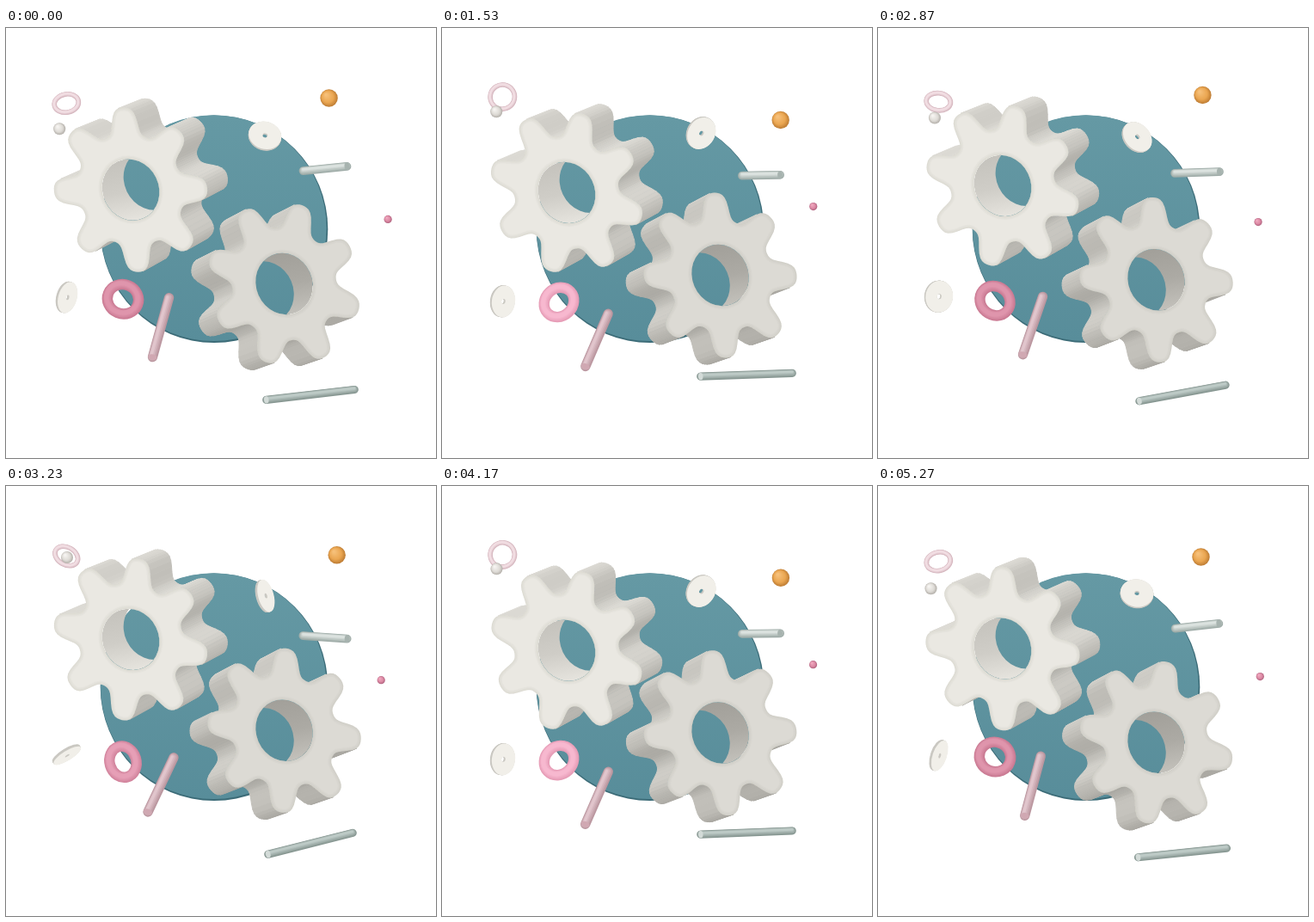
An HTML page with a canvas for the animation above (5310 ms loop, 500 by 500 pixels).

```html
<!DOCTYPE html>
<html lang="en">
<head>
<meta charset="utf-8">
<title>Gears</title>
<style>
  html, body { margin: 0; width: 100%; height: 100%; overflow: hidden; background: #fff; }
  canvas { display: block; }
</style>
</head>
<body>
<canvas id="stage" width="500" height="500"></canvas>
<script>
const ctx = document.getElementById('stage').getContext('2d');
const TAU = Math.PI * 2;
const PERIOD = 2655; // the 5310 ms loop holds two identical turns
const { sin, cos, hypot, atan2, abs } = Math;
const clamp = x => Math.max(0, Math.min(1, x));
const grey = l => `rgb(${l},${l - 2},${l - 8})`;
const lerp = (a, b, k) => a.map((c, i) => c + (b[i] - c) * k);
const mix = (a, b, k) => `rgb(${lerp(a, b, k)})`;

let v = 0; // phase of the current turn, 0..1
const wave = (mean, amp, peak) => mean + amp * cos(TAU * (v - peak));

function ball(x, y, r, light, base, dark) {
  const g = ctx.createRadialGradient(x - r * .35, y - r * .4, r * .1, x, y, r * 1.05);
  g.addColorStop(0, light);
  g.addColorStop(.6, base);
  g.addColorStop(1, dark);
  ctx.fillStyle = g;
  ctx.beginPath();
  ctx.arc(x, y, r, 0, TAU);
  ctx.fill();
}

// Circle seen along the unit normal n
function tilted(x, y, r, n) {
  const a = atan2(n[1], n[0]) + Math.PI / 2;
  ctx.moveTo(x + r * cos(a), y + r * sin(a));
  ctx.ellipse(x, y, r, r * abs(n[2]), a, 0, TAU);
}

function torus(x, y, r, tube, nx, ny, dark, light) {
  const n = [nx, ny, Math.sqrt(Math.max(0, 1 - nx * nx - ny * ny))];
  for (let i = 0; i < 5; i++) {
    ctx.beginPath();
    tilted(x - i * tube * .04, y - i * tube * .05, r, n);
    ctx.lineWidth = tube * (2 - i * .3);
    ctx.strokeStyle = mix(dark, light, i / 4);
    ctx.stroke();
  }
}

function washer(x, y, r, nx, ny, nz) {
  const len = hypot(nx, ny, nz) * (nz < 0 ? -1 : 1);
  const n = [nx / len, ny / len, nz / len];
  const lit = clamp((n[0] + .18) / .08);
  for (let i = -3; i <= 3; i++) {
    ctx.beginPath();
    tilted(x + n[0] * i * .5, y + n[1] * i * .5, r, n);
    tilted(x + n[0] * i * .5, y + n[1] * i * .5, 3, n);
    ctx.fillStyle = grey(i < 3 ? 190 + 12 * lit : 192 + 49 * lit);
    ctx.fill('evenodd');
  }
}

// Cylinder around (x, y) reaching (dx, dy) to both sides; cap is the end facing us
function rod(x, y, dx, dy, w, dark, light, cap, capColor) {
  const len = hypot(dx, dy);
  let px = dy / len, py = -dx / len;
  if (px * .5 + py * .9 > 0) { px = -px; py = -py; }
  ctx.lineCap = 'round';
  for (let i = 0; i < 5; i++) {
    const s = i * w * .045;
    ctx.beginPath();
    ctx.moveTo(x - dx + px * s, y - dy + py * s);
    ctx.lineTo(x + dx + px * s, y + dy + py * s);
    ctx.lineWidth = w * (1 - i * .18);
    ctx.strokeStyle = mix(dark, light, i / 4);
    ctx.stroke();
  }
  ctx.fillStyle = capColor;
  ctx.beginPath();
  ctx.ellipse(x + dx * cap, y + dy * cap, w * .3, w * .45, atan2(dy, dx), 0, TAU);
  ctx.fill();
}

function gear(cx, cy, turn, dx, dy, { face, side, wall }) {
  const N = 192, SQUASH = .9, HOLE = 36.3;
  const a = atan2(dy, dx), ca = cos(a), sa = sin(a);
  const pts = [];
  for (let i = 0; i < N; i++) {
    const f = i / N * TAU;
    const r = 82 + 17.2 * Math.tanh(1.45 * cos(8 * f));
    const x = r * cos(f + turn - a) * SQUASH, y = r * sin(f + turn - a);
    pts.push([x * ca - y * sa, x * sa + y * ca]);
  }

  // Side walls, painted from the far end of the depth direction forwards
  const sides = [];
  pts.forEach((p, i) => {
    const q = pts[(i + 1) % N];
    const len = hypot(q[0] - p[0], q[1] - p[1]);
    const nx = (q[1] - p[1]) / len, ny = (p[0] - q[0]) / len;
    if (nx * dx + ny * dy > 0) sides.push({ p, q, nx, ny, key: p[0] * dx + p[1] * dy });
  });
  sides.sort((s, t) => s.key - t.key);
  ctx.lineWidth = 1;
  ctx.lineJoin = 'round';
  for (const { p, q, nx, ny } of sides) {
    ctx.fillStyle = ctx.strokeStyle = grey(Math.round(side - 8 * nx - 20 * ny));
    ctx.beginPath();
    ctx.moveTo(cx + p[0], cy + p[1]);
    ctx.lineTo(cx + q[0], cy + q[1]);
    ctx.lineTo(cx + q[0] * .98 + dx, cy + q[1] * .98 + dy);
    ctx.lineTo(cx + p[0] * .98 + dx, cy + p[1] * .98 + dy);
    ctx.closePath();
    ctx.fill();
    ctx.stroke();
  }

  // Inside of the bore
  const bore = (x, y) => {
    ctx.moveTo(x + HOLE * SQUASH * ca, y + HOLE * SQUASH * sa);
    ctx.ellipse(x, y, HOLE * SQUASH, HOLE, a, 0, TAU);
  };
  ctx.save();
  ctx.beginPath();
  bore(cx, cy);
  ctx.clip();
  const g = ctx.createLinearGradient(cx, cy - 36, cx + 14, cy + 36);
  g.addColorStop(0, grey(wall - 10));
  g.addColorStop(.5, grey(wall));
  g.addColorStop(1, grey(wall + 24));
  ctx.fillStyle = g;
  ctx.beginPath();
  bore(cx, cy);
  bore(cx + dx, cy + dy);
  ctx.fill('evenodd');
  ctx.restore();

  // Front face with a soft rounded rim
  ctx.save();
  ctx.beginPath();
  pts.forEach(p => ctx.lineTo(cx + p[0], cy + p[1]));
  ctx.closePath();
  bore(cx, cy);
  ctx.fillStyle = grey(face);
  ctx.fill('evenodd');
  ctx.clip('evenodd');
  ctx.strokeStyle = 'rgba(150,145,135,.06)';
  for (let w = 2; w <= 8; w += 3) {
    ctx.lineWidth = w;
    ctx.stroke();
  }
  ctx.restore();
}

function backdrop() {
  ctx.fillStyle = '#fff';
  ctx.fillRect(0, 0, 500, 500);
  ctx.fillStyle = '#3c6c78';
  ctx.beginPath();
  ctx.arc(242, 233.7, 132.3, 0, TAU);
  ctx.fill();
  const g = ctx.createLinearGradient(0, 101, 0, 366);
  g.addColorStop(0, '#6599a4');
  g.addColorStop(1, '#588d9a');
  ctx.fillStyle = g;
  ctx.beginPath();
  ctx.arc(241.3, 232.6, 131.4, 0, TAU);
  ctx.fill();
}

function draw(now) {
  v = now % PERIOD / PERIOD;
  const deg = Math.PI / 180, p = TAU * v;
  backdrop();

  gear(145, wave(187.5, 9.5, .76), -3 * deg - p, 25, -12, { face: 234, side: 200, wall: 207 });
  gear(323.5, wave(290.3, 10.5, .87), 15.5 * deg + p, -22, 9.5, { face: 220, side: 191, wall: 172 });

  washer(301, wave(124.5, 3.5, .2), 19.3,
    sin(p + .03 * TAU), -.3 - .3 * cos(2 * p) - .25 * sin(p), wave(0, 1, .06));
  washer(70.5, wave(315, 3, .64), 18.5,
    .55 + .3 * cos(2 * p), .4 - .3 * cos(2 * (p - .08 * TAU)),
    cos(2 * (p - .07 * TAU)) + .45 * sin(p));

  rod(371, wave(169.5, 9.8, .355), wave(24, 2, .12), wave(-.7, 3.5, .34), 9.8,
    [158, 171, 167], [219, 226, 223], 1, '#a7b3af');
  rod(180, wave(354.5, 8.7, .62), wave(12.3, 4.3, .36), wave(-32.2, 2.6, .43), 11.3,
    [186, 150, 159], [225, 197, 204], -1, '#d0a8b2');
  rod(354, wave(414, 12.5, -.01), wave(51.7, 2.5, .72), wave(-5.5, 7, .74), 9.2,
    [134, 150, 145], [189, 202, 198], -1, '#d3dbd8');

  const glow = clamp(wave(.6, -.8, .03));
  torus(136, wave(318, 4.3, .36), 18.3, 6.2, wave(.3, .3, .34), wave(0, .35, .54),
    lerp([202, 122, 147], [230, 156, 182], glow), lerp([223, 149, 172], [247, 184, 207], glow));
  torus(70.3, wave(83, 5.2, .92), 14.2, 2.8, wave(0, .4, .8), wave(.4, .3, .09),
    [211, 180, 188], [241, 221, 226]);

  ball(wave(64.5, 7.5, .3), wave(101.3, 27.3, .85), 7, '#f6f4f1', '#dedbd6', '#aeaaa4');
  ball(wave(385.5, 10, .48), wave(92.5, 15, .62), 10.2, '#f6c07a', '#eaa651', '#b87730');
  ball(wave(437, 7.5, .95), wave(216.5, 10, .15), 4.6, '#f0a9bf', '#db88a3', '#a95c78');

  requestAnimationFrame(() => draw(performance.now() - start));
}

const start = performance.now();
draw(0);
</script>
</body>
</html>
```
